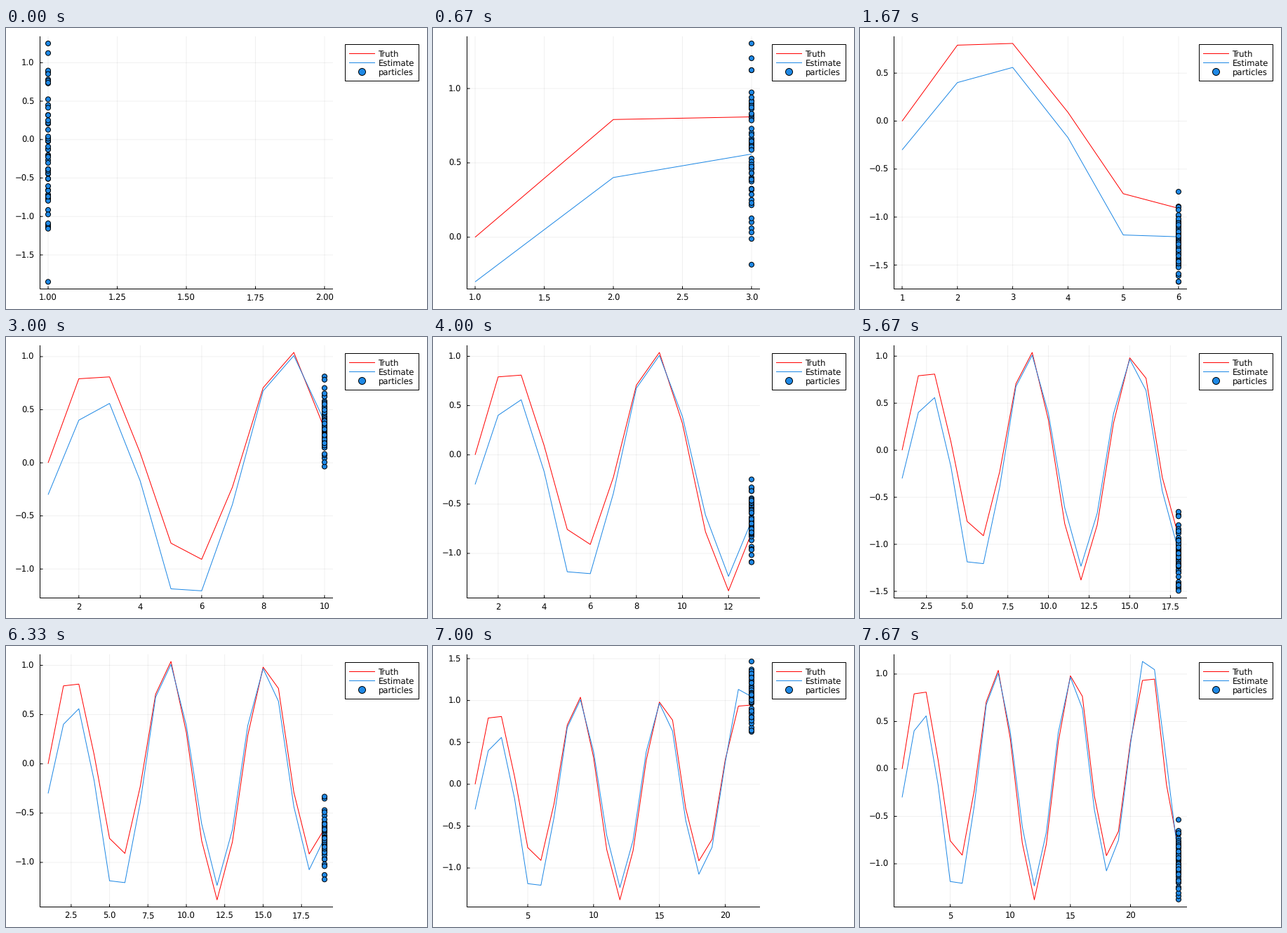
A matplotlib script for the animation above (8 s loop, 600 px wide and 400 px high).

```python
import numpy as np
import matplotlib.pyplot as plt
from matplotlib.animation import FuncAnimation
from matplotlib.patches import Circle, Rectangle

plt.rcParams.update({"path.snap": False, "text.hinting": "none",
                     "lines.solid_capstyle": "butt", "font.family": "DejaVu Sans"})

STEPS, LOOP_MS = 24, 8000
BLUE, RED = "#1E88E5", "#FF0000"
PX = 0.72  # points per pixel at 100 dpi
LEFT, RIGHT, TOP, BOTTOM = 48.5, 466, 11.8, 371.5
PAD = 0.03
PARTICLES = 60

# Turning points (time, value) of the slow drift and of the filter error
DRIFT = [(0, 0), (2, -.1), (5, .05), (8, .05), (11, -.38), (15, .115),
         (16, 0), (19, .14), (20, .02), (21, .11), (22, -.16), (23, 0)]
ERROR = [(0, -.3), (1, -.39), (2.5, -.18), (4, -.43), (7, -.03), (8, -.03),
         (10, .17), (13, .1), (15, -.13), (17, -.16), (19, -.03), (20, .2),
         (21, .1), (22, .24), (23, -.11)]

time = np.arange(STEPS)
truth = np.sin(time) + np.interp(time, *zip(*DRIFT))
estimate = truth + np.interp(time, *zip(*ERROR))


def cloud(t):
    """Particles around the estimate; the wide first guess narrows quickly."""
    z = np.random.default_rng(t).normal(size=PARTICLES)
    z /= np.where(z > 0, z.max(), -z.min())
    reach = .42 + 1.13 * np.exp(-t / 1.6)
    return estimate[t] + reach * z


def ticks(low, high, step):
    return np.arange(np.ceil(low / step), np.floor(high / step) + 1) * step


def pick_step(low, high):
    """Smallest round step that gives at most seven ticks."""
    return next(s for s in (.25, .5, 1, 2, 2.5, 5) if len(ticks(low, high, s)) <= 7)


def scale(low, high, start, end):
    """Padded limits and a function from data to pixels."""
    margin = PAD * (high - low)
    low, high = low - margin, high + margin
    return low, high, lambda v: start + (np.asarray(v) - low) / (high - low) * (end - start)


fig = plt.figure(figsize=(6, 4), dpi=100, facecolor="white")
ax = fig.add_axes([0, 0, 1, 1])


def stroke(x, y, color="black", **style):
    ax.plot(x, y, color=color, lw=PX, **style)


def label(x, y, text, ha):
    ax.text(x, y + 4.3, text, ha=ha, va="baseline", fontsize=11.6 * PX)


def dot(x, y, radius):
    ax.add_patch(Circle((x, y), radius, fc=BLUE, ec="black", lw=PX, zorder=5))


def draw_axes(x_range, y_range):
    x_low, x_high, to_x = x_range
    y_low, y_high, to_y = y_range
    step = pick_step(x_low, x_high)
    places = len(f"{step:g}".partition(".")[2])
    for v in ticks(x_low, x_high, step):
        x = to_x(v)
        stroke([x, x], [TOP, BOTTOM], alpha=.06, zorder=1)
        stroke([x, x], [BOTTOM, BOTTOM - 4], zorder=2)
        label(x, 383.2, f"{v:.{places}f}", "center")
    for v in ticks(y_low, y_high, .5):
        y = to_y(v)
        stroke([LEFT, RIGHT], [y, y], alpha=.06, zorder=1)
        stroke([LEFT, LEFT + 4], [y, y], zorder=2)
        label(40.5, y, f"{v + 0:.1f}".replace("-", "\u2212"), "right")
    stroke([LEFT, LEFT, RIGHT], [TOP, BOTTOM, BOTTOM], zorder=2)


def draw_legend():
    left, top, row = 483.5, 23.5, 13
    ax.add_patch(Rectangle((left, top), 105, 4 * row, fc="white", ec="black", lw=PX))
    for i, name in enumerate(("Truth", "Estimate", "particles"), start=1):
        y = top + i * row
        label(left + 47, y, name, "left")
        if name == "particles":
            dot(left + 24, y, 5)
        else:
            stroke([left + 5.5, left + 42.5], [y, y], RED if name == "Truth" else BLUE)


def draw(t):
    n = t + 1
    ax.clear()
    ax.set(xlim=(0, 600), ylim=(400, 0))
    ax.axis("off")
    particles = cloud(t)
    values = np.concatenate([truth[:n], estimate[:n], particles])
    x_range = scale(1, max(n, 2), LEFT - .3, RIGHT - .2)
    y_range = scale(values.min(), values.max(), BOTTOM, TOP)
    to_x, to_y = x_range[2], y_range[2]
    draw_axes(x_range, y_range)
    x = to_x(time[:n] + 1)
    stroke(x, to_y(truth[:n]), RED, zorder=3)
    stroke(x, to_y(estimate[:n]), BLUE, zorder=4)
    for y in to_y(particles):
        dot(x[-1], y, 3.5)
    draw_legend()


anim = FuncAnimation(fig, draw, frames=STEPS, interval=LOOP_MS / STEPS,
                     init_func=lambda: None, repeat=True, repeat_delay=0)
plt.show()
```
